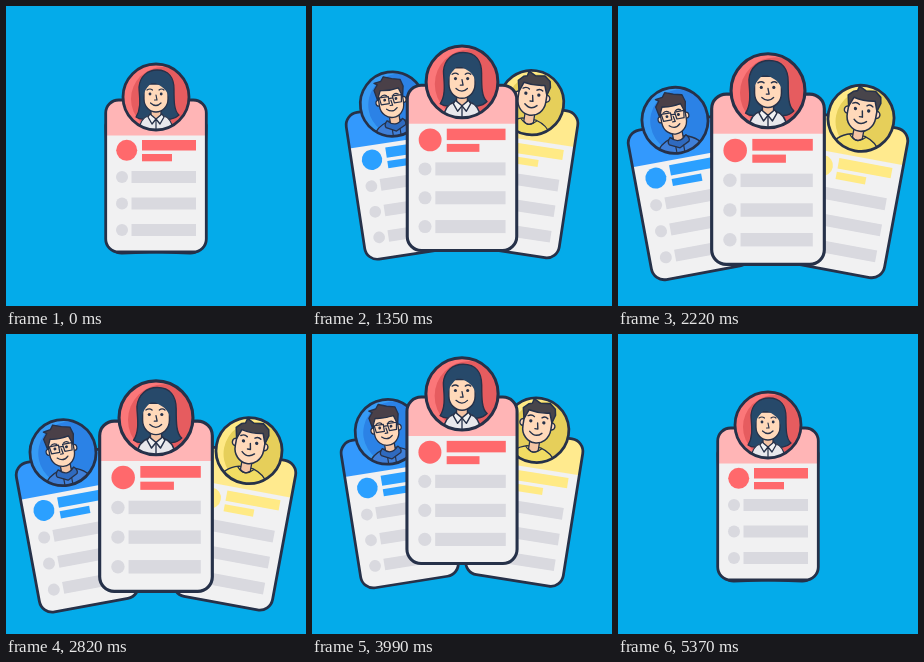
Animation, 300 px wide and 300 px high, one loop 5430 ms. Source, as an HTML page:

```html
<!DOCTYPE html>
<html lang="en">
<head>
<meta charset="utf-8">
<title>Profile cards</title>
<style>
html, body { margin: 0; width: 100%; height: 100%; overflow: hidden; background: #04abea; }
svg { display: block; width: 100%; height: 100%; }
</style>
</head>
<body>
<svg id="stage" viewBox="0 0 300 300"></svg>
<script>
const LOOP = 5430, REST = 5400, OPENING = 1780;
const INK = '#263149', SKIN = '#ffd9ba', GREY = '#d9d9df';
const stage = document.getElementById('stage');

// Cards are drawn around the centre of their portrait.
const rect = (x, y, w, h, fill, round = 0) =>
  `<rect x="${x}" y="${y}" width="${w}" height="${h}" rx="${round}" fill="${fill}"/>`;
const dot = (x, y, r, fill) => `<circle cx="${x}" cy="${y}" r="${r}" fill="${fill}"/>`;
const shape = (d, fill, width = 1.3) =>
  `<path d="${d}" fill="${fill}" stroke="${INK}" stroke-width="${width}" stroke-linejoin="round" stroke-linecap="round"/>`;
const line = d => shape(d, 'none', 1.2);
const group = (transform, content) => `<g transform="${transform}">${content}</g>`;

const face = shape('M-12 -13V2C-12 10 -6 15 0 15S12 10 12 2V-13Z', SKIN);
const neck = shape('M-5 11V20Q0 25 5 20V11Z', '#f4c4a4');
const features = dot(-6, -3, 1.4, INK) + dot(5.2, -3, 1.4, INK) +
  line('M-9 -7Q-6 -9 -3.5 -7M3 -7Q5.5 -9 8 -7M0 -2L1 3H-1.5M-5.5 6Q0 11 5 6');
const ears = dot(-12, -1, 3, SKIN) + dot(12, -1, 3, SKIN) +
  line('M-12 -4A3 3 0 0 0 -12 2M12 -4A3 3 0 0 1 12 2');
const shoulders = fill => shape('M-25 35C-23 23 -14 19 -7 17H7C14 19 23 23 25 35Z', fill);

const woman =
  shape('M-20 20C-14 11 -17 -2 -17 -10C-16 -21 -8 -27 1 -27C13 -27 18 -19 18 -8C18 4 18 14 23 18C18 23 11 23 7 21H-9C-13 23 -17 22 -20 20Z', '#27496a') +
  shape('M-17 35C-17 24 -12 20 -6 18H6C12 20 17 24 17 35Z', '#e8e8ec') + neck + face +
  '<path d="M-13 1C-12 -8 -7 -11 -3 -16C2 -11 10 -11 12.7 0L16 -14L6 -24H-8L-16 -13Z" fill="#27496a"/>' +
  features +
  shape('M-6 17L0 22L-4 27L-8 20ZM6 17L0 22L4 27L8 20Z', '#f1f1f2') + line('M0 23V34');

const glassesMan = shoulders('#3f7fd8') + neck +
  group('translate(-1 -2) scale(1.04)', ears + face +
    shape('M-13 -4L-15 -14L-11 -19L-14 -21L-7 -22L-4 -26L4 -23L12 -21L14 -14L12 -4L9 -13Q0 -11 -9 -13Z', '#4a4048') +
    features + line('M-11 -6H-2V1H-10ZM2 -6H11L10 1H3ZM-2 -4H2M-13 -5H-11')) +
  shape('M-8 16Q-12 20 -10 23L0 28L10 23Q12 20 8 16Q0 25 -8 16Z', '#2f6abf') + line('M-4 26V32M4 26V32');

const tuftMan = shoulders('#f1dc63') + neck +
  group('translate(0 -5) scale(1.2)', ears + face +
    shape('M-12 -4L-14 -13L-10 -17L-7 -18L-6 -22L0 -19L8 -20L13 -16L14 -11L12 -4L9 -12Q0 -10 -9 -12Z', '#48454b') +
    features) +
  line('M-8 18Q0 27 8 18M-15 29V34M15 29V34');

function makeCard({ head, accent, light, dark, portrait }) {
  const g = document.createElementNS('http://www.w3.org/2000/svg', 'g');
  const rows = [0, 1, 2].map(i => 80 + 26.5 * i)
    .map(y => dot(-34, y, 6, GREY) + rect(-24.5, y - 6, 64.5, 12, GREY)).join('');
  g.innerHTML = rect(-50.3, 3, 100.6, 152, head, 13) +
    `<path d="M-50.3 38.5H50.3V142A13 13 0 0 1 37.3 155H-37.3A13 13 0 0 1 -50.3 142Z" fill="#f1f1f2"/>` +
    `<rect x="-50.3" y="3" width="100.6" height="152" rx="13" fill="none" stroke="${INK}" stroke-width="2.8"/>` +
    dot(-29.3, 53.3, 10.5, accent) + rect(-14, 43, 54, 10.5, accent) + rect(-14, 57, 30, 7.3, accent) + rows +
    dot(0, 0, 33, light) +
    `<g clip-path="url(#round)">${dot(7, 2, 32, dark)}${portrait}</g>` +
    `<circle r="33" fill="none" stroke="${INK}" stroke-width="2.8"/>`;
  stage.append(g);
  return g;
}

stage.innerHTML = '<defs><clipPath id="round"><circle r="33"/></clipPath></defs>';
const right = makeCard({ head: '#ffea8e', accent: '#ffea85', light: '#ffe985', dark: '#e6cf5a', portrait: tuftMan });
const left = makeCard({ head: '#3399fd', accent: '#2ba0ff', light: '#369bf5', dark: '#2b82e6', portrait: glassesMan });
const middle = makeCard({ head: '#ffb5b6', accent: '#ff696c', light: '#fb7779', dark: '#e65c5f', portrait: woman });

// Eases from one [time, height] turning point to the next.
function bob(points, t) {
  const next = points.findIndex(p => p[0] > t);
  if (next < 1) return points.at(next)[1];
  const [t0, a] = points[next - 1], [t1, b] = points[next];
  return a + (b - a) * (1 - Math.cos(Math.PI * (t - t0) / (t1 - t0))) / 2;
}
const middleBob = [[180, 91], [1560, 75], [2520, 87.5], [3820, 58.5], [5160, 91]];
const sideBob = [[0, 105], [1130, 97], [2700, 119], [4230, 96.5], [REST, 105]];

// The fan opens with a slow start and closes as the mirror image.
function spread(t) {
  const u = Math.min(1, Math.max(0, Math.min(t, REST - t) / OPENING)) ** 1.5;
  return u * u * (3 - 2 * u);
}

function place(card, x, y, angle, scale) {
  card.setAttribute('transform', `translate(${x} ${y}) rotate(${angle}) scale(${scale})`);
}

function draw(now) {
  const t = now % LOOP, s = spread(t), y = bob(sideBob, t);
  const reach = 5 + 88 * s, angle = 2 + 8.5 * s ** .8, scale = .91 + .09 * s;
  place(right, 150 + reach, y - 2 * s, angle, scale);
  place(left, 150 - reach, y, -angle, scale);
  place(middle, 150, bob(middleBob, t), 0, 1 + .12 * s);
}

const start = performance.now();
function tick() {
  draw(performance.now() - start);
  requestAnimationFrame(tick);
}
tick();
</script>
</body>
</html>
```
